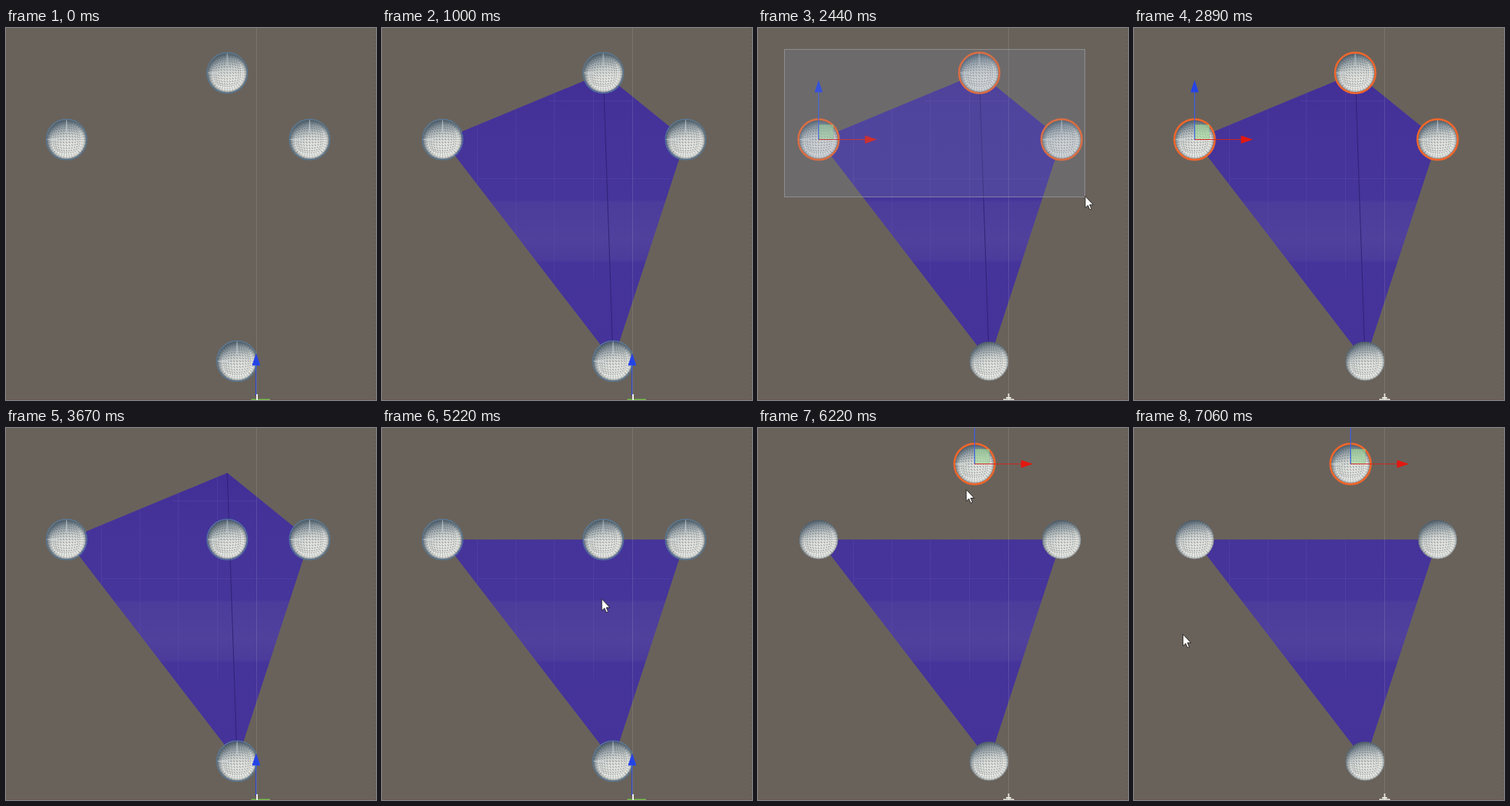
Write an HTML page that moves like this. It is 510 px wide and 512 px high and loops after 7110 ms.

```html
<!DOCTYPE html>
<html lang="en">
<head>
<meta charset="utf-8">
<title>Mesh handles</title>
<style>
  html, body { margin: 0; width: 100%; height: 100%; overflow: hidden; background: #69625b; }
  svg { display: block; width: 100%; height: 100%; }
</style>
</head>
<body>
<svg viewBox="0 0 510 512">
  <defs>
    <linearGradient id="shade" x1="0.36" y1="0" x2="0.6" y2="1">
      <stop offset="0" stop-color="#74828e"/>
      <stop offset="0.2" stop-color="#a3adb3"/>
      <stop offset="0.42" stop-color="#dfe1de"/>
      <stop offset="0.62" stop-color="#f4f3ed"/>
      <stop offset="1" stop-color="#fbfaf4"/>
    </linearGradient>
    <radialGradient id="rim" cx="0.53" cy="0.55" r="0.53">
      <stop offset="0.75" stop-color="#3f505d" stop-opacity="0"/>
      <stop offset="1" stop-color="#3f505d" stop-opacity="0.5"/>
    </radialGradient>
    <linearGradient id="violet" gradientUnits="userSpaceOnUse" x1="0" y1="62" x2="0" y2="458">
      <stop offset="0" stop-color="#422f96"/>
      <stop offset="0.17" stop-color="#45339a"/>
      <stop offset="0.44" stop-color="#46359a"/>
      <stop offset="0.45" stop-color="#4c3c9b"/>
      <stop offset="0.58" stop-color="#50419d"/>
      <stop offset="0.65" stop-color="#4b3b9b"/>
      <stop offset="0.66" stop-color="#45349a"/>
      <stop offset="1" stop-color="#45339a"/>
    </linearGradient>
    <clipPath id="inside"><polygon id="clipShape"/></clipPath>
    <g id="ball">
      <circle r="26.7" fill="url(#shade)"/>
      <path id="wire" fill="none" stroke="#35444f" stroke-width="0.6" stroke-opacity="0.42"/>
      <circle r="26.7" fill="url(#rim)"/>
    </g>
  </defs>

  <rect width="510" height="512" fill="#69625b"/>
  <path d="M508.5 0V512" stroke="#5d584f" stroke-width="1" stroke-dasharray="2 4"/>
  <path d="M0 511.5H510" stroke="#6d5653"/>

  <g id="mesh">
    <polygon id="face" fill="url(#violet)"/>
    <path clip-path="url(#inside)" d="M131.5 0V230M184.5 0V310M237.5 0V345M291.5 0V345M230 100.5H345M131 207.5H398"
          stroke="#6a5cae" stroke-opacity="0.28" fill="none"/>
    <path id="seam" d="M305 62L318.5 458" stroke="#2c2070" stroke-width="0.9"/>
  </g>
  <path d="M345.5 0V512" stroke="#fff" stroke-opacity="0.12"/>

  <g id="balls"></g>

  <g id="origin">
    <path d="M345.5 503V512M342 509L349 509M338 511.5H353" stroke="#e9e7df" stroke-width="1.8"/>
  </g>
  <g id="rootAxes">
    <path d="M344.5 464V506" stroke="#2b49dc" stroke-width="1.2"/>
    <path d="M344.8 447.5L350.6 464.5H339Z" fill="#2544e6"/>
    <path d="M338 511.3H364" stroke="#78c04a" stroke-width="1.4"/>
    <path d="M346 504V512" stroke="#f4f4ee" stroke-width="2"/>
  </g>
  <g id="axes">
    <rect x="1" y="-20" width="19" height="20" fill="#a4dc9c" fill-opacity="0.6" stroke="#8cc684" stroke-width="0.7"/>
    <path d="M0 0V-65" stroke="#3a5cea" stroke-width="1.2"/>
    <path d="M0 -82L5.6 -65H-5.6Z" fill="#2544e6"/>
    <path d="M0 0H65" stroke="#d4211a" stroke-width="1.2"/>
    <path d="M80.5 0L64 5.5V-5.5Z" fill="#e3180f"/>
  </g>

  <rect id="marquee" x="36.5" y="29.5" fill="#7d8ea8" fill-opacity="0.2" stroke="#a4a8ad" stroke-opacity="0.65"/>
  <path id="cursor" d="M0 -0.6V15.4L3.7 12L6.2 17.9L8.6 16.8L6.1 11.1H11Z" fill="#fff" stroke="#1b1917" stroke-width="0.9"/>
</svg>

<script>
const LOOP = 7110;
const el = id => document.getElementById(id);
const show = (node, on) => node.setAttribute('visibility', on ? 'visible' : 'hidden');
const move = (node, p) => node.setAttribute('transform', `translate(${p[0]} ${p[1]})`);

// Wireframe of a cube inflated to a sphere, seen along one axis
function wirePath(radius, cells) {
  const half = cells / 2;
  const warp = i => Math.tan(i / half * Math.PI / 4);
  let d = '';
  const line = (from, to, point) => {
    for (let i = from; i <= to; i++) {
      const [x, y, z] = point(i);
      const k = radius / Math.hypot(x, y, z);
      d += (i === from ? 'M' : 'L') + (x * k).toFixed(1) + ' ' + (y * k).toFixed(1);
    }
  };
  for (let j = -half; j <= half; j++) {
    const a = warp(j);
    line(-half, half, i => [a, warp(i), 1]);
    line(-half, half, i => [warp(i), a, 1]);
    for (const s of [-1, 1]) {
      line(0, half, i => [a, s, warp(i)]);
      line(0, half, i => [s, a, warp(i)]);
      if (j >= 0 && j < half) {
        line(-half, half, i => [warp(i), s, a]);
        line(-half, half, i => [s, warp(i), a]);
      }
    }
  }
  for (let j = 1 - cells; j < cells; j++) {
    line(Math.max(-half, -half - j), Math.min(half, half - j), i => [warp(i), warp(i + j), 1]);
  }
  return d;
}
el('wire').setAttribute('d', wirePath(26.5, 10));

const LEFT = [83.5, 153.5], RIGHT = [418.5, 153.5], BOTTOM = [318.5, 458.5];
const TOP = [305, 61.8], ALIGNED = [305, 153.5], LIFTED = [298.5, 49.5];

const balls = [LEFT, TOP, RIGHT, BOTTOM].map(() => {
  const g = document.createElementNS('http://www.w3.org/2000/svg', 'g');
  g.innerHTML = '<use href="#ball"/><g><path d="M0 -27V-9M-27 0H-12" stroke="#dfe6e8" stroke-opacity=".65"/>' +
    '<circle r="27.9" fill="none"/></g>';
  el('balls').append(g);
  return { g, mark: g.lastChild, ring: g.lastChild.lastChild };
});

// Pointer trips: [ms, x, y]
const trips = [
  [[1050, 430, 454], [1220, 290, 290], [1400, 110, 100], [1520, 27, 34], [1610, 35, 30],
   [2010, 36, 30], [2140, 110, 76], [2260, 270, 150], [2390, 436, 225], [2440, 451, 232],
   [2560, 456, 240], [2850, 465, 466]],
  [[4610, 413, 511], [4800, 380, 400], [5000, 325, 272], [5120, 304, 232], [5220, 303, 236],
   [5330, 304, 232], [5610, 312, 145], [5830, 312, 145], [6050, 305, 41], [6110, 303, 42],
   [6220, 287, 85], [6360, 292, 140], [6480, 298, 190], [6620, 262, 285], [6760, 190, 333],
   [6920, 100, 305], [7020, 68, 285], [LOOP, 67, 284]]
];

function along(keys, t) {
  let i = 1;
  while (i < keys.length - 1 && t > keys[i][0]) i++;
  const [a, b] = [keys[i - 1], keys[i]];
  const k = Math.min(1, Math.max(0, (t - a[0]) / (b[0] - a[0])));
  return [a[1] + (b[1] - a[1]) * k, a[2] + (b[2] - a[2]) * k];
}

function pointerAt(t) {
  const trip = trips.find(k => t >= k[0][0] && t <= k[k.length - 1][0]);
  return trip && along(trip, t);
}

function topBallAt(t) {
  if (t < 2900) return TOP;
  if (t < 5830) return ALIGNED;
  return along([[5830, ...ALIGNED], [6050, ...LIFTED]], t);
}

// Indices of picked balls, or null while their parent is selected
function pickedAt(t, pointer) {
  if (t >= 5780) return [1];
  if (t < 2030 || t >= 3390) return null;
  if (t >= 2440) return [0, 1, 2];
  const hit = [0, 1, 2].filter(i => {
    const [x, y] = [LEFT, TOP, RIGHT][i];
    return pointer[0] > x - 27 && pointer[1] > y - 27;
  });
  return hit.length ? hit : null;
}

function draw(t) {
  const pointer = pointerAt(t);
  const places = [LEFT, topBallAt(t), RIGHT, BOTTOM];
  const picked = pickedAt(t, pointer);

  const quad = t < 4440;
  const corners = (quad ? [LEFT, TOP, RIGHT, BOTTOM] : [LEFT, RIGHT, BOTTOM]).join(' ');
  el('face').setAttribute('points', corners);
  el('clipShape').setAttribute('points', corners);
  el('mesh').style.display = t >= 1000 ? '' : 'none';
  el('seam').style.display = quad ? '' : 'none';

  balls.forEach((b, i) => {
    move(b.g, places[i]);
    const on = picked && picked.includes(i);
    show(b.mark, !picked || on);
    b.ring.setAttribute('stroke', on ? '#f0662b' : '#557d9f');
    b.ring.setAttribute('stroke-width', on ? 2.6 : 1.2);
  });

  show(el('rootAxes'), !picked);
  show(el('origin'), picked);
  show(el('axes'), picked);
  if (picked) move(el('axes'), places[picked[0]]);

  const dragging = t > 2010 && t < 2500;
  show(el('marquee'), dragging);
  if (dragging) {
    el('marquee').setAttribute('width', Math.max(0, Math.min(450.5, pointer[0]) - 36.5));
    el('marquee').setAttribute('height', Math.max(0, Math.min(232.5, pointer[1] + 0.5) - 29.5));
  }

  show(el('cursor'), pointer);
  if (pointer) move(el('cursor'), pointer);
}

const start = performance.now();
function tick() {
  draw((performance.now() - start) % LOOP);
  requestAnimationFrame(tick);
}
tick();
</script>
</body>
</html>
```
